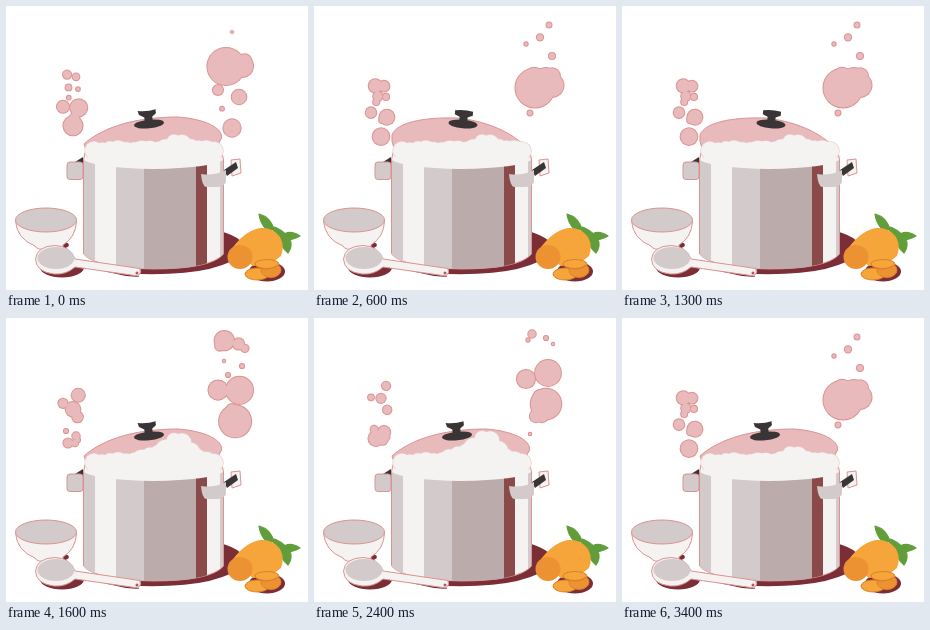
An HTML page that plays this animation: 302 px wide and 284 px high, repeating every 3.5 s.

```html
<!DOCTYPE html>
<html lang="en">
<head>
<meta charset="utf-8">
<title>Boiling pot</title>
<style>
html, body { margin: 0; width: 100%; height: 100%; overflow: hidden; background: #fff; }
svg { display: block; width: 100%; height: 100%; }
.line { stroke: #dc9292; stroke-width: 1; }
.pink { fill: #e9babb; }
.white { fill: #f4f3f2; }
.grey { fill: #d2cacb; }
.dark { fill: #393435; }
.wine { fill: #7b2e36; }
.leaf { fill: #629d3b; stroke: #629d3b; stroke-width: 1.2; stroke-linejoin: round; }
.amber { fill: #f6a53a; }
.rust { fill: #ec9233; }
</style>
</head>
<body>
<svg viewBox="0 0 302 284">
  <g id="rims" fill="#dc9292"></g>
  <g id="puffs" class="pink"></g>

  <path class="wine" d="M214 225Q242 233 238 246Q215 270 134 268L128 258Z"/>

  <g id="lidLeft">
    <path class="pink line" d="M78 138C98 120 132 111 172 111C199 113 217 122 215.500 132Q214 137 208 142L80 144Z"/>
    <g class="dark" transform="rotate(-6 143 118)">
      <ellipse cx="143" cy="118" rx="15" ry="4.3"/>
      <path d="M133 104Q143 106 151 104L151 108L147 111L147 117H139L139 111L134 108Z"/>
    </g>
  </g>
  <g id="lidRight">
    <path class="pink line" d="M78 129C82 117 108 111 143 112C185 116 217 138 217 153L200 152L80 142Q77 135 78 129Z"/>
    <g class="dark" transform="rotate(5 149 118)">
      <ellipse cx="149" cy="118" rx="14.500" ry="4.3"/>
      <path d="M140 105Q149 103 158 105L158 109L153 111L153 117H145L145 111L140 109Z"/>
    </g>
  </g>

  <path class="dark" d="M69 156L77 151V162H69Z"/>
  <rect class="grey line" x="61" y="156" width="16" height="17.500" rx="3"/>

  <path class="white line" d="M77.500 154Q79 139 90 137L206 138Q217 144 217.500 154V248Q205 263 147 263Q90 262 77.500 248Z"/>
  <g id="foam"></g>
  <clipPath id="side"><path d="M78 154Q90 162 147 163Q205 162 217 154V248Q205 263 147 263Q90 262 78 248Z"/></clipPath>
  <g clip-path="url(#side)">
    <path class="grey" d="M78 150H89V264H78ZM110 150H139V264H110ZM214 150H218V264H214Z"/>
    <path fill="#bcabab" d="M138 150H191V264H138Z"/>
    <path fill="#8a4a4a" d="M190 150H201V264H190Z"/>
  </g>

  <path class="white line" d="M225 154L234 153L235 167L226 170Z"/>
  <path class="dark" d="M218 164L230 156L232 162L221 170Z"/>
  <path class="grey" d="M195 168Q208 170 220 164V176Q218 181 210 181H200Q196 180 195 168Z"/>

  <ellipse class="wine" cx="53" cy="239" rx="10" ry="4"/>
  <path class="white line" d="M9.500 215Q11 233 29 240Q30 244 44 244Q59 244 57 239Q70 231 70.500 215Z"/>
  <ellipse class="grey line" cx="40" cy="214" rx="30.500" ry="12"/>

  <ellipse class="wine" cx="56" cy="261.500" rx="22" ry="10"/>
  <path class="wine" d="M78 261L130 266L133 271L120 270Z"/>
  <path class="white line" d="M69 253L134 262.500Q136 267 132 270L69 261Q60 269 48 268Q30 266 29.500 253Q31 240 49 239.500Q64 240 69 253Z"/>
  <ellipse class="grey" cx="50" cy="252" rx="18.500" ry="11"/>
  <circle cx="131" cy="267" r="1.500" fill="#b0595f"/>

  <ellipse class="wine" cx="261" cy="265.500" rx="18" ry="10"/>
  <path class="leaf" d="M253 208Q265 211 268 224L260 223Q254 217 253 208ZM264 220Q276 222 284 233Q287 240 282 247Q275 241 272 231ZM274 232Q282 222 294 230Q288 234 275 235Z"/>
  <path class="amber" d="M225 244Q238 225 254 222Q267 221 274 231Q279 240 275 250Q266 259 247 260Z"/>
  <ellipse class="rust" cx="234" cy="251" rx="12.500" ry="12"/>
  <g stroke="#dc812b">
    <ellipse class="amber" cx="251" cy="268" rx="12" ry="6"/>
    <ellipse class="rust" cx="265" cy="264" rx="10" ry="7.500"/>
    <ellipse class="amber" cx="261" cy="258" rx="12" ry="4.500"/>
    <path d="M252 261Q262 266 272 259" fill="none"/>
  </g>
</svg>
<script>
const NS = "http://www.w3.org/2000/svg";
const STEP = 100, LOOP = 35, BOIL = 7, LID_HOLD = 4;
const byId = id => document.getElementById(id);
const show = (node, on) => { node.style.display = on ? "" : "none"; };
const set = (node, attrs) => { for (const key in attrs) node.setAttribute(key, attrs[key]); };
const add = (parent, tag) => parent.appendChild(document.createElementNS(NS, tag));

const ease = t => t * t * (3 - 2 * t);
const mix = (a, b, t) => a + (b - a) * t;
const bell = (x, mid, width) => Math.exp(-(((x - mid) / width) ** 2));
// Swells quickly, then dwindles; peaks at 1.
const plump = u => u * (1 - u) ** 1.5 / .186;

// A puff is born at its own step of the boil and rises for one whole boil.
const puffs = [];
function puff(birth, from, to, size) {
  puffs.push({ birth, from, to, size, rim: add(byId("rims"), "circle"), body: add(byId("puffs"), "circle") });
}

function drawPuff({ birth, from, to, size, rim, body }, phase) {
  const age = (phase - birth + BOIL) % BOIL;
  const t = ease(age / (BOIL - 1));
  const r = size * plump((age + 1) / (BOIL + 1));
  const at = { cx: mix(from[0], to[0], t), cy: mix(from[1], to[1], t) };
  set(rim, { ...at, r: r + .6 });
  set(body, { ...at, r: Math.max(r - .4, .4) });
}

// Right column: a cloud off the lid, then a second one half a boil later
puff(0, [226, 122], [238, 50], 16.5);
puff(0, [233, 91], [235, 19], 14);
puff(0, [212, 84], [212, 38], 10);
puff(1, [226, 97], [226, 26], 7);
puff(3, [222, 98], [222, 57], 12);
puff(3, [228, 98], [236, 48], 12);
puff(3, [222, 95], [218, 43], 8);
puff(3, [216, 116], [216, 98], 3);
puff(4, [222, 105], [218, 16], 20);
puff(4, [240, 100], [232, 20], 12);
puff(4, [211, 103], [214, 22], 10);
puff(4, [238, 85], [239, 26], 8);

// Left column
puff(5, [67, 135], [67, 76], 10);
puff(5, [73, 115], [72, 64], 9);
puff(5, [57, 109], [57, 77], 6.5);
puff(6, [68, 114], [75, 84], 6);
puff(2, [62, 125], [61, 64], 9);
puff(2, [70, 118], [70, 67], 7.5);
puff(2, [69, 125], [62, 78], 6.5);
puff(2, [60, 113], [63, 90], 4.5);
puff(2, [72, 122], [72, 80], 4.5);

// Foam: a row of round bumps with one crest that heaves with the boil
const CREST = 173;
const bumps = Array.from({ length: 16 }, (_, i) => ({
  x: 88 + i * 8, r: 9 + 2 * Math.sin(i * 2.3),
  rim: add(byId("foam"), "circle")
}));
const froth = add(byId("foam"), "path");
bumps.forEach(bump => { bump.body = add(byId("foam"), "circle"); });

function drawFoam(phase) {
  const heave = Math.sin(Math.PI * phase / (BOIL - 1));
  let ridge = "";
  bumps.forEach(({ x, r, rim, body }, i) => {
    const calm = 135.5 + Math.sin(i * 1.7) - 7 * bell(x, CREST, 13);
    const top = calm - heave * 16 * bell(x, CREST, x < CREST ? 30 : 16);
    const at = { cx: x, cy: top + r };
    set(rim, { ...at, r: r + .6, fill: "#e9c9ca" });
    set(body, { ...at, r, class: "white" });
    ridge += `L${x} ${top + r * .65}`;
  });
  set(froth, { class: "white", d: `M79 155${ridge}L216 155Q190 166 147 166Q95 165 79 155Z` });
}

function draw(time) {
  const step = Math.floor(time / STEP) % LOOP;
  const phase = step % BOIL;
  const tipped = Math.floor(step / LID_HOLD) % 2 === 1;
  puffs.forEach(p => drawPuff(p, phase));
  drawFoam(phase);
  show(byId("lidLeft"), !tipped);
  show(byId("lidRight"), tipped);
}

const begin = performance.now();
function tick() {
  draw(performance.now() - begin);
  requestAnimationFrame(tick);
}
tick();
</script>
</body>
</html>
```
